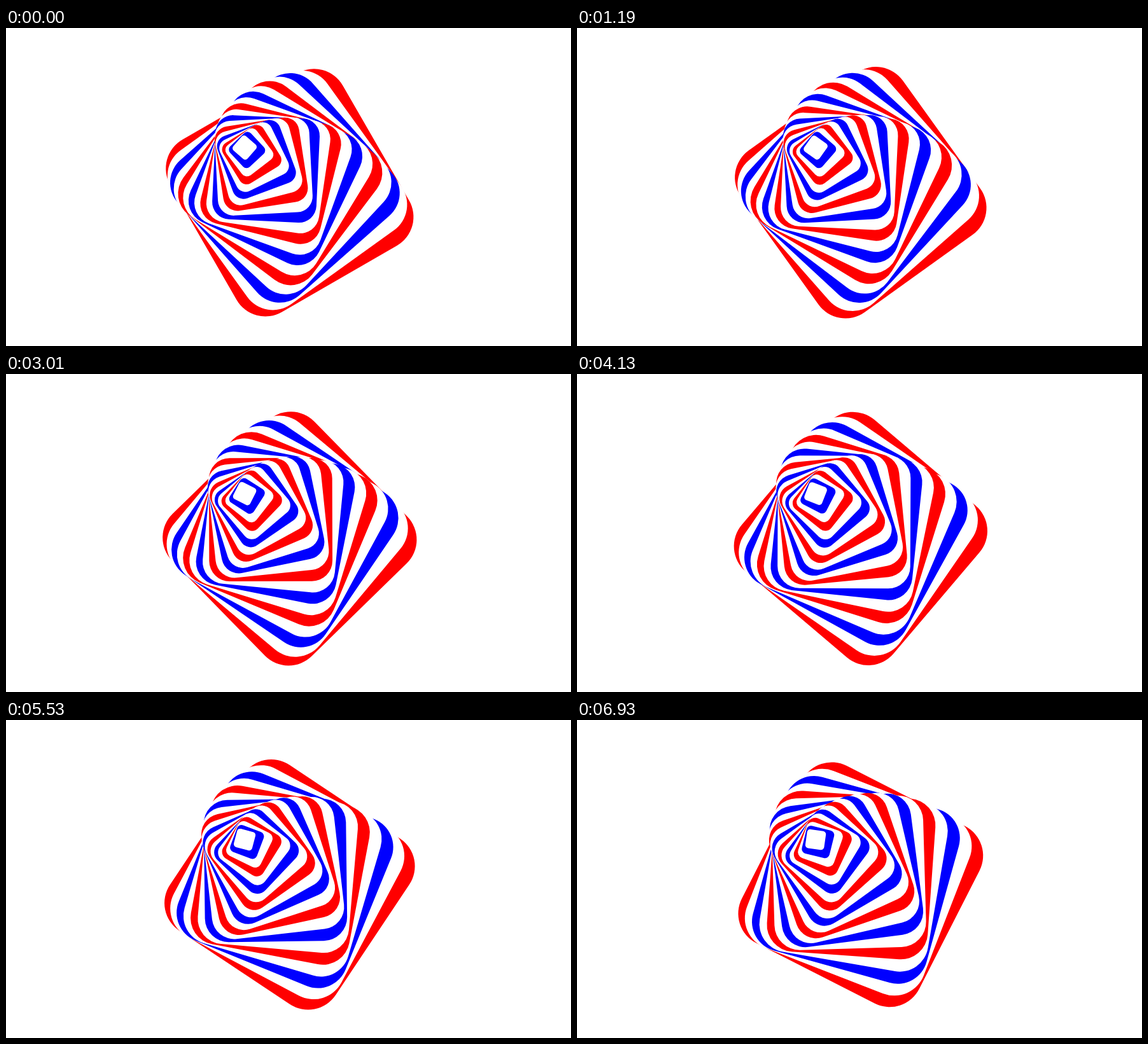
An HTML page with a canvas for the animation above (7000 ms loop, 888 by 500 pixels).

```html
<!DOCTYPE html>
<html lang="en">
<head>
<meta charset="utf-8">
<title>Twisted squares</title>
<style>
  html, body { margin: 0; width: 100%; height: 100%; overflow: hidden; background: #fff; }
  canvas { display: block; }
</style>
</head>
<body>
<canvas id="stage" width="888" height="500"></canvas>
<script>
const ctx = document.getElementById('stage').getContext('2d');

const COUNT = 20;
const STEP = 7.45;                    // growth of the half side per square
const ORIGIN = { x: 367.6, y: 180.6 };
const TWIST = 0.1;                    // radians between neighbouring squares
const START = Math.PI / 3;            // first angle of the outermost square
const TURN = Math.PI / 540;           // radians per tick
const TICK = 70, TICKS = 100;
const COLORS = ['#f00', '#fff', '#00f', '#fff'];

function drawSquare(depth, turn) {
  const size = COUNT + 1 - depth;
  const half = size * STEP;
  ctx.save();
  ctx.translate(ORIGIN.x + half / 2, ORIGIN.y + half / 2);
  ctx.rotate(START - depth * TWIST - turn);
  ctx.fillStyle = COLORS[depth % COLORS.length];
  ctx.beginPath();
  ctx.roundRect(-half, -half, 2 * half, 2 * half, half / 3);
  ctx.fill();
  ctx.restore();
}

function draw() {
  const tick = Math.floor(performance.now() / TICK) % TICKS;
  ctx.fillStyle = '#fff';
  ctx.fillRect(0, 0, 888, 500);
  for (let depth = 0; depth < COUNT; depth++) drawSquare(depth, tick * TURN);
  requestAnimationFrame(draw);
}
draw();
</script>
</body>
</html>
```
